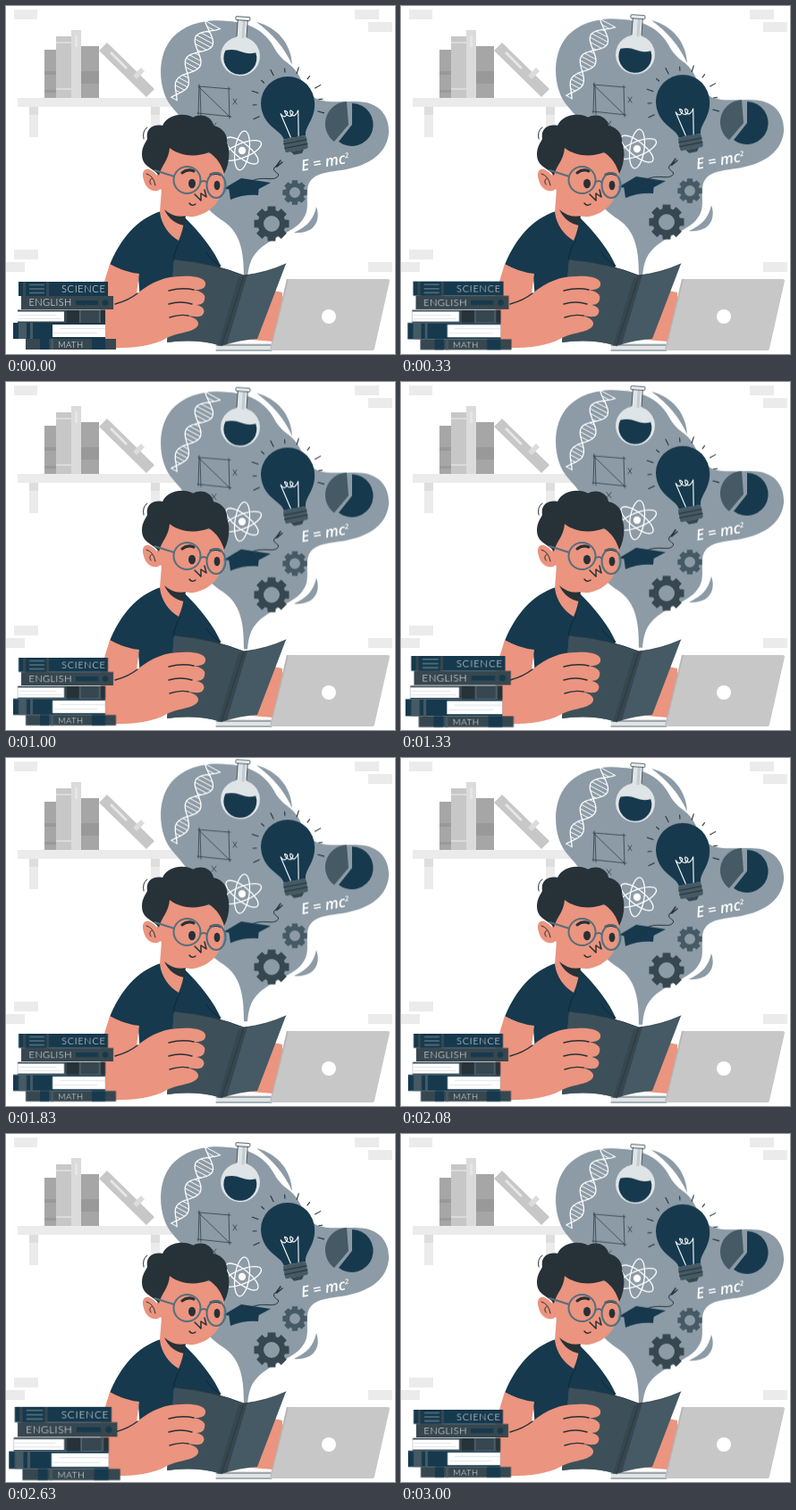
Write an HTML page that moves like this. It is 435x390 px and loops after 3.04 s.

```html
<!DOCTYPE html>
<html lang="en">
<head>
<meta charset="utf-8">
<title>Learning</title>
<style>
  html, body { margin: 0; width: 100%; height: 100%; overflow: hidden; background: #fff; }
  svg { display: block; width: 435px; height: 390px; }
  .navy { fill: #16394d; }
  .slate { fill: #455a64; }
  .steel { fill: #37474f; }
  .ink { fill: #263238; }
  .skin { fill: #eb947f; }
  .blob { fill: #8c9ba6; }
  .pale { fill: #ebebeb; }
  .line, .chalk { fill: none; stroke-linecap: round; stroke-linejoin: round; }
  .line { stroke: var(--c, #263238); stroke-width: var(--w, 1); }
  .chalk { stroke: #fff; stroke-width: var(--w, 1.3); }
  .label { font: 300 11px Lato, "Open Sans", sans-serif; fill: #fff; letter-spacing: .7px; }
  .formula { font: italic 600 17px "Open Sans", Lato, sans-serif; fill: #fff; }
  .idea { animation: float 3040ms linear infinite; }
  .stack { transform-origin: 65.5px 347.5px; animation: beat 3040ms linear infinite; }
  @keyframes float {
    0%, 100% { transform: translateY(0); }
    20.7% { transform: translateY(-3.6px); }
    43.75% { transform: translateY(-7.3px); }
    55.9% { transform: translateY(-10px); }
    60.2% { transform: translateY(-9.8px); }
    68.4% { transform: translateY(-6.2px); }
    86.5% { transform: translateY(-2.1px); }
  }
  @keyframes beat {
    0%, 11.5%, 36.2%, 47.7%, 60.2%, 80.6%, 95.4%, 100% { transform: scale(1); }
    5.3%, 40.1%, 53.9%, 87.8% { transform: scale(1.1); }
    90.5% { transform: scale(1.075); }
  }
</style>
</head>
<body>
<svg viewBox="0 0 435 390">
  <!-- wall and shelf -->
  <path class="pale" d="M9 4h26v11H9zM390 4h27v11h-27zM405 18h27v11h-27zM9 273h27v11H9zM0 287h21v11H0zM405 287h27v11h-27zM13 103h343v10H13zM26 113h10v34H26zM162 113h10v34h-10z"/>
  <path fill="#dedede" d="M26 113h10v9H26zM162 113h10v9h-10z"/>
  <path fill="#a6a6a6" d="M43 49h13v54H43zM84 45h20v58H84z"/>
  <path fill="#c7c7c7" d="M56 34h17v69H56zM104 50l9-9 53 52-9 9z"/>
  <path fill="#dbdbdb" d="M73 27h11v76H73zM56 40h17v2H56zM56 92h17v2H56zM142 78l9-9 4 4-9 9z"/>
  <path fill="#999" d="M43 73h13v4H43zM43 94h13v3H43zM84 73h20v14H84z"/>
  <path fill="#e6e6e6" d="M77 33h3v13h-3zM116 53l2-2 18 18-2 2z"/>

  <!-- cloud of ideas -->
  <g class="idea">
    <path class="blob" d="M266 305C266 276 263 255 243 241C224 229 210 212 214 180C217 150 202 132 187 115C171 98 168 62 182 41C196 20 224 14 248 17C274 18 291 30 300 47C307 60 315 63 321 69C332 80 334 100 350 105C366 110 382 105 402 108C422 112 429 128 428 143C425 168 402 180 375 184C351 187 338 190 337 207C336 222 340 231 329 243C317 255 294 261 281 275C273 283 271 294 270 305Z"/>
    <path class="blob" d="M280 18C304 24 319 43 320 66C311 46 298 31 280 18Z"/>
    <path class="blob" d="M347 225C353 242 343 256 322 254C337 247 344 239 347 225Z"/>
    <path id="dna" class="chalk"/>
    <path id="rungs" class="chalk" style="--w:1"/>

    <g transform="rotate(4 262 56)">
      <path fill="#dfe4e7" d="M256.5 15h11v20A22 22 0 1 1 256.5 35z"/>
      <path fill="#c3ccd1" d="M262 16h3v20h-3z"/>
      <rect x="254" y="12" width="16" height="4" rx="1" fill="#eef1f2" stroke="#37474f" stroke-width=".8"/>
      <path class="navy" d="M245 51Q254 48 262 51T279 51A18.5 18.5 0 1 1 245 51Z"/>
      <path class="line" style="--w:.7" d="M256.5 16v18M267.5 16v18"/>
    </g>

    <path class="line" style="--w:.7" d="M215 90L251 93M216 88L215 122M217 91L218 123M214 120L252 124M249 91L250 126M216 91L250 124M254 104l4 6M258 104l-4 6M230 131l5 6M235 131l-5 6"/>

    <path id="rays" class="line" style="--w:1.1"/>
    <g transform="rotate(-11 315 109)">
      <path class="navy" d="M303 148C303 138 285 131 285 109A30 30 0 0 1 345 109C345 131 328 138 328 148Z"/>
      <path class="chalk" style="--w:1.1" d="M311 147L305 119q4 8 8 0q-5-6-2 2q5 6 8-1q-4-6-3 2q4 5 9-3L320 147"/>
      <rect class="slate" x="302" y="148" width="26" height="15" rx="2"/>
      <path class="line" d="M302 153h26M302 158h26"/>
      <path class="steel" d="M308 163h15l-3 4h-9z"/>
    </g>

    <path class="navy" d="M387 133V109A24 24 0 1 1 372 152Z"/>
    <path class="slate" d="M383 133L381 107A25 25 0 0 0 367 152Z"/>

    <g class="chalk" transform="translate(264 162)">
      <ellipse rx="23" ry="8" transform="rotate(-22)"/>
      <ellipse rx="22" ry="8" transform="rotate(38)"/>
      <ellipse rx="22" ry="8" transform="rotate(98)"/>
      <circle r="3.5" fill="#fff"/>
    </g>

    <path class="navy" d="M249 203L283 201L282 212Q265 211 251 217Z"/>
    <path class="navy" d="M243 205L263 193L296 198L279 207Z"/>
    <path class="line" d="M268 200C284 188 296 197 303 192C309 187 297 187 300 181L306 177"/>
    <path class="line" style="--w:1.4" d="M302 180L307 173M303 180L309 175"/>

    <g transform="rotate(-10 331 185)">
      <text class="formula" x="331" y="185">E = mc</text>
      <text class="formula" x="381" y="179" style="font-size:8px">2</text>
    </g>
    <path id="gearBig" class="steel" fill-rule="evenodd"/>
    <path id="gearSmall" class="slate" fill-rule="evenodd"/>
  </g>

  <!-- reader -->
  <path class="navy" d="M173 230C146 239 128 261 116 290L148 304L150 328L230 326L240 291C232 273 219 256 198 235Z"/>
  <path class="skin" d="M174 205L172 231C174 246 182 256 193 263Q198 252 200 236Z"/>
  <path class="ink" d="M177 228Q188 238 201 235L199 246Q184 243 177 228Z"/>
  <path class="skin" d="M168 156L169 190C158 177 150 183 154 195C157 207 167 210 173 205C180 222 195 238 210 236C228 233 242 218 243 201L245 168Z"/>
  <path class="line" d="M157 188Q165 190 167 201M163 193Q159 196 162 200"/>
  <path class="ink" d="M171 190C165 181 152 181 152 166C152 158 156 153 158 149C156 137 165 132 175 134C181 121 199 119 209 125C219 119 231 125 232 134C246 137 248 149 247 153C251 162 250 177 244 188C241 178 236 170 227 164C212 170 194 168 183 159C182 173 174 178 171 190Z"/>
  <path class="line" d="M158 136Q152 140 154 149M187 126Q198 120 209 125"/>
  <ellipse class="ink" cx="208" cy="199" rx="4" ry="5.2"/>
  <ellipse class="ink" cx="236" cy="201" rx="3.4" ry="5.2"/>
  <path class="line" style="--w:3" d="M197 187Q203 182 210 185M229 189Q235 186 240 189"/>
  <path class="line" style="--w:1.5" d="M211 211L218 218L218 210L224 214L222 206M205 221Q208 225 212 222"/>
  <g fill="none" stroke="#536f7c" stroke-width="2">
    <circle cx="202.5" cy="195" r="15"/>
    <ellipse cx="235" cy="201" rx="10.5" ry="14"/>
    <path d="M217 198Q221 194 225 198M188 191L166 184"/>
  </g>
  <path class="line" style="--c:#0d2939" d="M195 263Q189 272 187 285M224 276Q230 286 240 291"/>

  <path class="skin" d="M286 316L309 321L309 333L298 376L274 374Z"/>
  <path fill="#e3e3e3" d="M235 378h63v8h-63z"/>
  <path class="line" style="--c:#536f7c" d="M235 380h61M235 386h62"/>
  <path class="slate" d="M188 284Q231 288 266 302Q291 299 313 289L281 373Q262 374 241 381Q215 372 180 377Z"/>
  <path fill="#3d505a" d="M188 284Q231 288 266 302L238 380Q212 373 180 377Z"/>
  <path class="steel" d="M260 304L270 301L247 379L237 381Z"/>
  <path class="line" style="--w:.7" d="M188 284Q231 288 266 302Q291 299 313 289M266 302L241 381"/>

  <path class="skin" d="M116 289Q131 298 149 300L146 323C164 308 179 303 196 303C209 302 221 304 223 310C224 317 217 319 208 318C218 319 224 323 222 329C221 335 214 336 207 334C218 335 223 339 221 344C219 350 211 348 203 347C214 350 217 355 214 359C209 366 190 366 178 373C162 382 136 384 113 383C108 362 104 345 106 322Z"/>
  <path class="line" style="--w:1.4" d="M210 318Q197 315 182 319M208 334Q195 330 182 334M204 347Q194 345 183 349M147 322Q137 330 122 334"/>

  <!-- laptop -->
  <path fill="#b5b5b5" d="M314 306h3L299 386h-4z"/>
  <path fill="#c7c7c7" d="M316 306h111q2 0 2 2L412 384q0 2-2 2H296z"/>
  <circle cx="361" cy="348" r="8" fill="#fff"/>

  <!-- pile of textbooks -->
  <g class="stack">
    <path class="navy" d="M14 309h100v16H14z"/>
    <path class="steel" d="M19 309h29v16H19z"/>
    <path class="navy" d="M22 309h23v16H22z"/>
    <path stroke="#536f7c" stroke-width="1.6" d="M26 312.5h17M26 317h17M26 321.5h17"/>
    <text class="label" x="62" y="321">SCIENCE</text>

    <path class="steel" d="M17 325h103v15H17z"/>
    <path class="navy" d="M78 330h25v5H78z"/>
    <circle class="navy" cx="111" cy="332.5" r="3.3"/>
    <text class="label" x="25.5" y="336" style="letter-spacing:.4px">ENGLISH</text>

    <path class="steel" d="M13 340.5h98V355H13z"/>
    <path fill="#fff" d="M13 342.5h52v11H13z"/>
    <path class="ink" d="M68 341h14v14H68zM106 341h5v14h-5z"/>
    <path fill="#52656f" d="M82 341h1.5v14H82zM104 341h1.5v14H104z"/>
    <path stroke="#d5dade" stroke-width=".7" d="M14 346.5h42M14 350.5h48"/>

    <path class="navy" d="M8 355h103v18H8z"/>
    <path class="slate" d="M14 355h9v18h-9zM27 355h3v18h-3z"/>
    <path fill="#fff" d="M52 357h59v14H52z"/>
    <path stroke="#d5dade" stroke-width=".7" d="M60 361.5h51M54 366.5h48"/>

    <path class="steel" d="M22 373h101v12H22z"/>
    <path class="navy" d="M38 373h10v12H38zM96 373h15v12H96z"/>
    <path class="slate" d="M50 373h3v12h-3z"/>
    <text class="label" x="58" y="383" style="font-size:9.5px;letter-spacing:.4px">MATH</text>
  </g>
</svg>
<script>
  const setPath = (id, d) => document.getElementById(id).setAttribute('d', d);
  const polar = (x, y, r, a) => `${(x + r * Math.cos(a)).toFixed(2)} ${(y + r * Math.sin(a)).toFixed(2)}`;

  function gear(x, y, r, hole) {
    const pts = [];
    for (let i = 0; i < 8; i++) {
      const a = i * Math.PI / 4;
      for (const [k, da] of [[.78, -.3], [1, -.22], [1, .22], [.78, .3]]) pts.push(polar(x, y, r * k, a + da));
    }
    return `M${pts.join('L')}ZM${x - hole} ${y}a${hole} ${hole} 0 1 0 ${2 * hole} 0a${hole} ${hole} 0 1 0 ${-2 * hole} 0Z`;
  }
  setPath('gearBig', gear(297, 244, 20, 9));
  setPath('gearSmall', gear(323, 209, 14, 6));

  // Double helix along a slanted axis, narrowing downwards
  const strand = (u, side) => {
    const w = side * (12 - 6 * u) * Math.cos((u * 3.5 - .8) * Math.PI);
    return `${(231 - 43 * u + w * .88).toFixed(1)} ${(21 + 83 * u + w * .47).toFixed(1)}`;
  };
  const steps = [...Array(61).keys()].map(i => i / 60);
  setPath('dna', [1, -1].map(s => 'M' + steps.map(u => strand(u, s)).join('L')).join(''));
  setPath('rungs', steps.filter((u, i) => i % 3 === 0).map(u => `M${strand(u, 1)}L${strand(u, -1)}`).join(''));

  let rays = '';
  for (let i = 0; i < 11; i++) {
    const a = (155 + i * 22) * Math.PI / 180;
    rays += `M${polar(315, 109, 35, a)}L${polar(315, 109, i % 2 ? 39 : 42, a)}`;
  }
  setPath('rays', rays);
</script>
</body>
</html>
```
